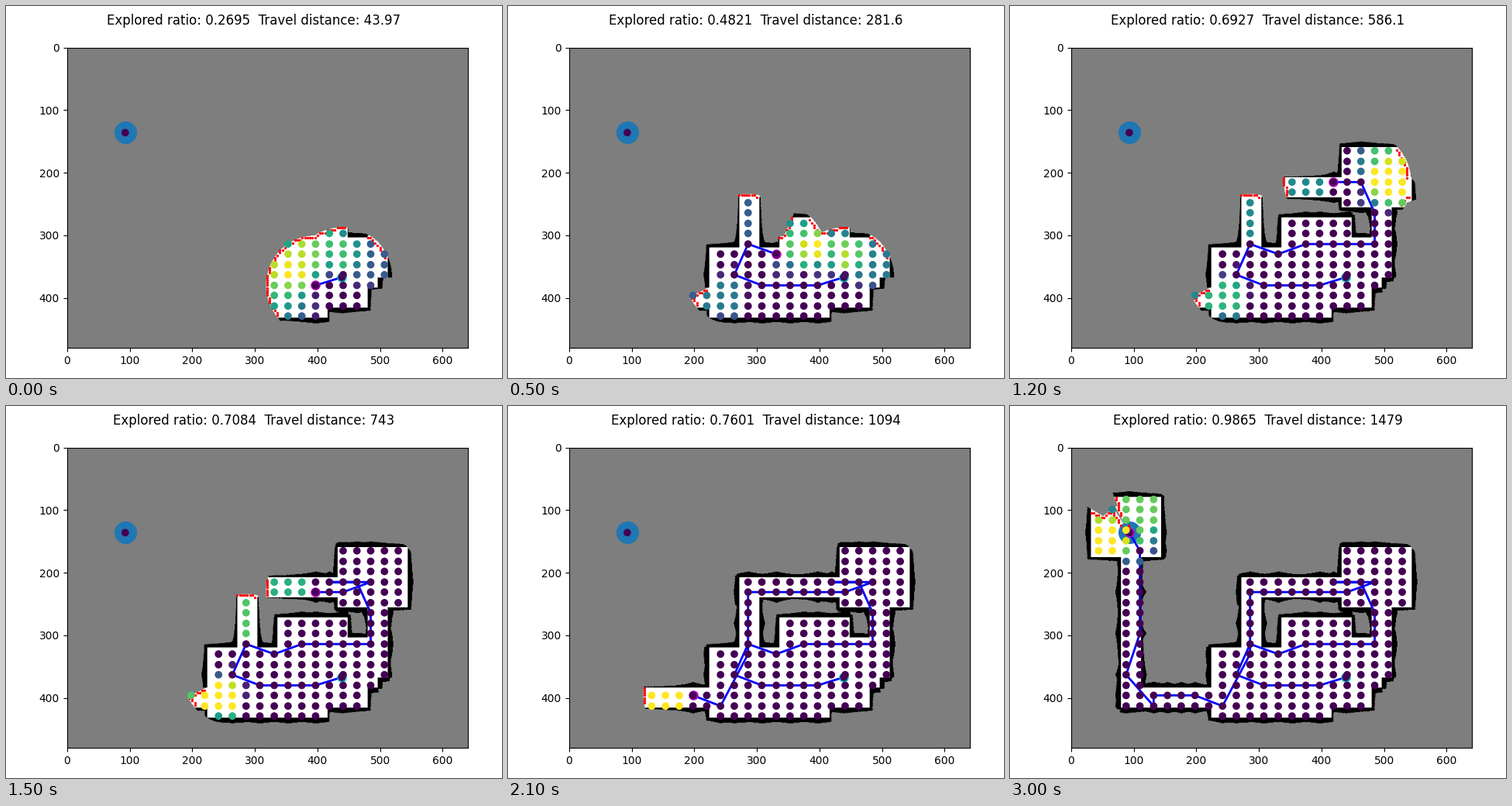
These frames come from a looping animation (640x480 px, 3100 ms). A matplotlib script:

```python
import numpy as np
import matplotlib.pyplot as plt
from matplotlib.animation import FuncAnimation

W, H = 640, 480
UNKNOWN, FREE, WALL = 127, 255, 1
SENSOR, VIEW, TILE, BLOCK = 80, 70, 16, 4
INTERVAL = 100

# Open floor as (left, top, right, bottom), in tiles
ROOMS = [
    (14, 20, 26, 27), (26, 20, 30, 26), (21, 17, 28, 25), (28, 19, 31, 24),
    (30, 16, 32, 23), (27, 10, 34, 16), (17, 13, 27, 15), (17, 13, 19, 20),
    (5, 24, 14, 26), (5, 11, 7, 26), (2, 5, 9, 11),
]
START, GOAL = (439, 367), (93, 136)
# Turning points between start and goal: (column, row, moves to get there)
TURNS = [
    (18, 23, 1), (14, 23, 2), (12, 22, 1), (13, 19, 1), (15, 20, 1),
    (17, 19, 1), (22, 19, 3), (22, 16, 1), (21, 13, 1), (19, 13, 1),
    (22, 13, 1), (20, 14, 1), (18, 14, 1), (13, 14, 2), (13, 20, 2),
    (11, 25, 1), (9, 24, 1), (6, 24, 3), (6, 25, 1), (4, 22, 1),
    (5, 18, 1), (5, 10, 2),
]

GX = np.linspace(0, W - 1, 30).round().astype(int)
GY = np.linspace(0, H - 1, 30).round().astype(int)
GRID = np.array([(x, y) for x in GX for y in GY])


def build_path():
    """Split each straight leg into moves that land on grid nodes."""
    path, (col, row) = [START], TURNS[0][:2]
    for c, r, moves in TURNS:
        for k in range(1, moves + 1):
            path.append((GX[col + (c - col) * k // moves],
                         GY[row + (r - row) * k // moves]))
        col, row = c, r
    return np.array(path + [GOAL])


def build_walls():
    solid = np.ones((H, W), bool)
    for left, top, right, bottom in np.array(ROOMS) * TILE:
        solid[top:bottom, left:right] = False
    # thin post beside the goal
    solid[GOAL[1] - 3:GOAL[1] - 1, GOAL[0] - 2] = True
    return solid


def walk(x, y, x1, y1):
    """Step many grid lines at once, one axis move per step."""
    dx, dy = abs(x1 - x), abs(y1 - y)
    sx, sy = np.where(x1 > x, 1, -1), np.where(y1 > y, 1, -1)
    err, length = dx - dy, dx + dy
    for step in range(length.max(initial=0)):
        yield x.clip(0, W - 1), y.clip(0, H - 1), step < length
        flat = err > 0
        x = x + sx * flat
        y = y + sy * ~flat
        err = err + np.where(flat, -2 * dy, 2 * dx)


def scan(belief, solid, pos):
    """Reveal floor up to the sensor range and a thin layer of wall."""
    a = np.radians(np.arange(0, 360, 0.5))
    x0, y0 = np.full(a.size, pos[0]), np.full(a.size, pos[1])
    x1 = np.rint(x0 + SENSOR * np.cos(a)).astype(int)
    y1 = np.rint(y0 + SENSOR * np.sin(a)).astype(int)
    hits = np.zeros(a.size, int)
    live = np.ones(a.size, bool)
    for x, y, inside in walk(x0, y0, x1, y1):
        hit = solid[y, x]
        live &= inside
        hits += hit & live
        live &= np.where(hit, hits < 10, hits == 0)
        belief[y[live], x[live]] = np.where(hit[live], WALL, FREE)


def find_frontier(belief):
    """Free blocks that touch unknown ones."""
    small = belief.reshape(H // BLOCK, BLOCK, W // BLOCK, BLOCK).min(axis=(1, 3))
    pad = np.pad((small == UNKNOWN).astype(int), 1)
    h, w = small.shape
    near = sum(pad[i:i + h, j:j + w]
               for i in range(3) for j in range(3) if (i, j) != (1, 1))
    rows, cols = np.where((small == FREE) & (near > 1) & (near < 8))
    return np.column_stack([cols, rows]) * BLOCK


def count_visible(belief, nodes, frontier):
    """Number of frontier points each node can see."""
    gap = np.linalg.norm(nodes[:, None] - frontier[None], axis=-1)
    n, f = np.where(gap < VIEW)
    clear = np.ones(n.size, bool)
    for x, y, inside in walk(*nodes[n].T, *frontier[f].T):
        clear &= ~inside | (belief[y, x] == FREE)
    return np.bincount(n[clear], minlength=len(nodes))


def explore(path):
    solid = build_walls()
    belief = np.full((H, W), UNKNOWN)
    scan(belief, solid, START)
    states = []
    for move in range(1, len(path)):
        scan(belief, solid, path[move])
        free = belief[GRID[:, 1], GRID[:, 0]] == FREE
        nodes = np.vstack([START, GOAL, GRID[free]])
        frontier = find_frontier(belief)
        utility = count_visible(belief, nodes, frontier)
        visited = (nodes[:, None] == path[None, :move + 1]).all(-1).any(1)
        utility[visited] = 0
        states.append(dict(
            belief=belief.copy(), frontier=frontier, nodes=nodes,
            utility=utility, ratio=(belief == FREE).sum() / (~solid).sum()))
    return states


PATH = build_path()
STATES = explore(PATH)
TRAVEL = np.cumsum(np.linalg.norm(np.diff(PATH, axis=0), axis=1))

fig, ax = plt.subplots(figsize=(6.4, 4.8), dpi=100)
image = ax.imshow(STATES[0]["belief"], cmap="gray", vmin=WALL, vmax=FREE)
ax.axis((0, W, H, 0))
ax.scatter(*GOAL, s=400, color="C0")
dots = ax.scatter([], [], c=[], cmap="viridis", zorder=5)
edge = ax.scatter([], [], c="r", s=2, zorder=3)
trail, = ax.plot([], [], "b", linewidth=2)
robot, = ax.plot([], [], "mo", markersize=8)
ax.plot(*START, "co", markersize=8)
title = fig.suptitle("")


def draw(i):
    state, done = STATES[i], PATH[:i + 2]
    image.set_data(state["belief"])
    dots.set_offsets(state["nodes"])
    dots.set_array(state["utility"])
    dots.set_clim(0, state["utility"].max())
    edge.set_offsets(state["frontier"])
    trail.set_data(*done.T)
    robot.set_data(*done[-1:].T)
    title.set_text(f"Explored ratio: {state['ratio']:.4g}  "
                   f"Travel distance: {TRAVEL[i]:.4g}")
    return image, dots, edge, trail, robot, title


draw(0)
fig.tight_layout()
anim = FuncAnimation(fig, draw, frames=len(STATES), interval=INTERVAL,
                     repeat=True, repeat_delay=0)
plt.show()
```
